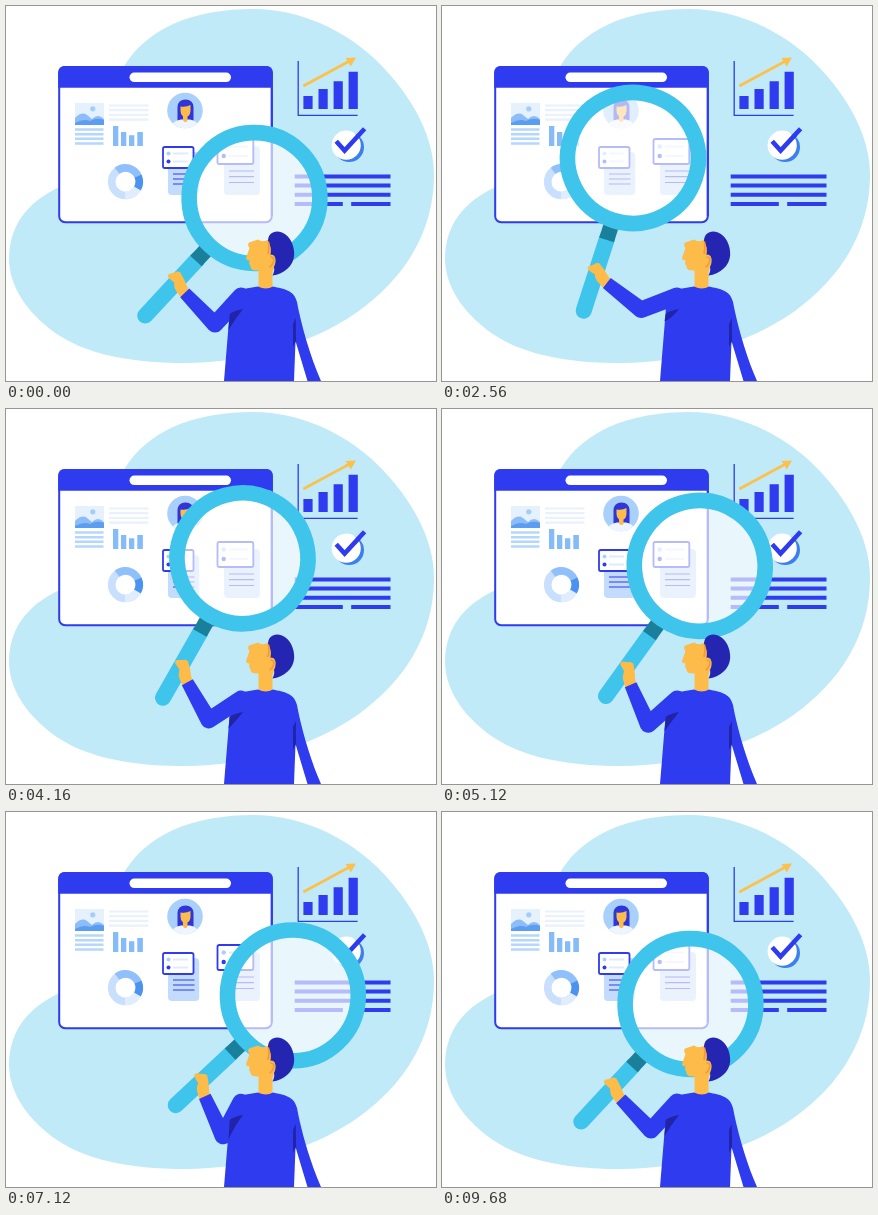
Write an HTML page that moves like this. It is 430 px wide and 375 px high and loops after 9.76 s.

```html
<!DOCTYPE html>
<html lang="en">
<head>
<meta charset="utf-8">
<title>Research dashboard</title>
<style>
html, body { margin: 0; width: 100%; height: 100%; overflow: hidden; background: #fff; }
svg { display: block; width: 430px; height: 375px; }
</style>
</head>
<body>
<svg viewBox="0 0 430 375">
  <path fill="#c1eaf9" d="M247 3C300 3 352 30 385 70C415 105 429 140 428 172C427 225 400 272 350 307C305 338 240 357 180 357C120 357 70 347 38 318C15 298 3 275 3 252C4 215 25 193 60 178C90 165 98 130 105 95C112 62 130 36 165 19C190 7 220 3 247 3Z"/>

  <!-- window -->
  <rect x="53.2" y="61" width="212.6" height="155.3" rx="6" fill="#fff" stroke="#2f3bee" stroke-width="2"/>
  <path fill="#2f3bee" d="M52.2 81.8V67Q52.2 60 59 60H260Q266.8 60 266.8 67V81.8Z"/>
  <rect x="123.5" y="66.5" width="101.5" height="9.6" rx="4.8" fill="#fff"/>

  <!-- picture and copy -->
  <rect x="69" y="97" width="29" height="22" fill="#e6f1fe"/>
  <circle cx="86.8" cy="102.8" r="2.6" fill="#a4cdfb"/>
  <path fill="#8dbdf8" d="M69 119V112Q76 105 81 109L86 113Q92 107 98 113V119Z"/>
  <path fill="#5b9df0" d="M69 119V117Q78 112 84 115Q91 111 98 114V119Z"/>
  <path stroke="#b5d6fd" stroke-width="2.4" d="M69 123.5H97.5M69 128.2H97.5M69 132.8H97.5M69 137.5H97.5"/>
  <path stroke="#e9f1fd" stroke-width="2.2" d="M103 99.5H142.5M103 104.2H142.5M103 108.9H142.5M103 113.6H142.5"/>
  <path fill="#86bbfa" d="M107 120h5.3v20h-5.3zM115 126h5.3v14h-5.3zM123 129.3h5.3v10.7h-5.3zM131.3 126h5.6v14h-5.6z"/>

  <!-- donut -->
  <g fill="none" stroke-width="7.6">
    <circle cx="119.5" cy="175.7" r="13.8" stroke="#c8dffd"/>
    <path stroke="#8fc0fb" d="M111 164.8A13.8 13.8 0 0 1 132 170"/>
    <path stroke="#4c93f0" d="M132 170A13.8 13.8 0 0 1 131.4 182.6"/>
    <path stroke="#e0edfe" d="M131.4 182.6A13.8 13.8 0 0 1 119 189.5"/>
  </g>

  <!-- avatar -->
  <clipPath id="face"><circle cx="179" cy="104.5" r="17.8"/></clipPath>
  <circle cx="179" cy="104.5" r="17.8" fill="#a9cffb"/>
  <g clip-path="url(#face)">
    <path fill="#2f35d8" d="M171.5 116V101Q172 93.5 179.5 93.5Q187 93.5 187.5 101V116Z"/>
    <path fill="#eef5ff" d="M164 123Q166 114.500 175 113.500H184Q192 114.500 194 123Z"/>
    <path fill="#fdbb49" d="M174.500 100.500Q180 101.500 184.500 99V105Q184 109.500 181.500 110.500V114.500Q179.500 118 177 114.500V110.500Q174.500 108.500 174.500 105Z"/>
  </g>

  <!-- cards -->
  <rect x="162" y="146" width="31.2" height="43" rx="4" fill="#c3dcfd"/>
  <rect x="157" y="141" width="30.5" height="21" rx="1.800" fill="#fff" stroke="#2f3bee" stroke-width="1.800"/>
  <circle cx="162.500" cy="147.500" r="2" fill="#a9cffb"/>
  <circle cx="162.500" cy="155.500" r="2" fill="#2f3bee"/>
  <path stroke="#dfebfe" stroke-width="2" d="M167 147.500H182M167 155.500H182"/>
  <path stroke="#2f3bee" stroke-width="1.200" d="M167 168H188.500M167 173H188.500M167 178H188.500"/>

  <rect x="218" y="140" width="36" height="49" rx="4" fill="#c3dcfd"/>
  <rect x="211.500" y="133" width="35.800" height="25" rx="1.800" fill="#fff" stroke="#2f3bee" stroke-width="1.800"/>
  <circle cx="217.700" cy="140.500" r="2.200" fill="#a9cffb"/>
  <circle cx="217.700" cy="150" r="2.200" fill="#2f3bee"/>
  <path stroke="#dfebfe" stroke-width="2" d="M223 140.500H242M223 150H242"/>
  <path stroke="#2f3bee" stroke-width="1.200" d="M223 165H248M223 170.700H248M223 176.500H248"/>
  <path stroke="#2f3bee" stroke-width="2" d="M265.800 82V210"/>

  <!-- growth chart -->
  <path fill="none" stroke="#2f3bee" stroke-width="1.300" d="M292.200 55V109.300H351.600"/>
  <path fill="#2f3bee" d="M297.400 90h9.200v13h-9.200zM312.500 83h9.200v20h-9.200zM327.600 75.200h9.200v27.800h-9.200zM342.600 65.800h9.200v37.200h-9.200z"/>
  <path stroke="#fcc04c" stroke-width="2.800" d="M297.300 80L344 54.800"/>
  <path fill="#fcc04c" d="M339.500 52L350 51.500L344.800 60.500Z"/>

  <!-- tick -->
  <circle cx="343.200" cy="141.200" r="14.800" fill="#3c80ee"/>
  <circle cx="340.200" cy="139.200" r="14.600" fill="#fff"/>
  <path fill="none" stroke="#2f3bee" stroke-width="4.600" d="M330.200 135.200L338.600 144.600L358.600 122.800"/>

  <path stroke="#2f3bee" stroke-width="4" d="M288.700 170.500H384.500M288.700 179.500H384.500M288.700 188.700H384.500M288.700 198H336.800M345.200 198H384.500"/>

  <!-- magnifier, handle pointing down -->
  <g id="lens">
    <circle r="60" fill="#fff" fill-opacity=".65"/>
    <path stroke="#3fc4ec" stroke-width="16" stroke-linecap="round" d="M0 84V160.500"/>
    <path stroke="#1a7f9b" stroke-width="15.500" d="M0 70V86"/>
    <circle r="65.400" fill="none" stroke="#3fc4ec" stroke-width="15.600"/>
  </g>

  <!-- person -->
  <path fill="#fdbb49" d="M264 233Q257 237 252 233.500L243 236.500Q241 239 243.500 242L240 252Q240 254 243.500 254.500L243 258Q244.500 259 244.500 261Q245 265 252.500 264.500V283Q260 287 266.500 283V266L270 255Z"/>
  <path fill="#2426b2" d="M262 235C262 227 269 223.500 276 226.500C284 230 288.500 239 288.200 249C287.500 260 278 268 266.500 269.500Q269 265 268 261Q271 255 268.500 250Q266 247.500 264.500 249Q266 241 262 235Z"/>
  <path fill="none" stroke="#f39a3a" stroke-width="1.600" d="M262.500 235.500Q263.500 243 262 248M264.500 251Q269 251 267.500 256Q266 260 263.500 261"/>
  <path fill="#2f3bee" d="M218 375L223.500 308C224 292 228 284 240 282.500L252 280.500Q260 284.500 267 280.500C278 283 288 284 291 296C295 318 304 350 315 375H301.500L289.500 335L288 375Z"/>
  <path fill="#2124a8" d="M287 341V318L289.800 312L290 335Z"/>
  <path id="hand" fill="#fdbb49" d="M-2 5L4 6.500L9 8.500L18 11Q21 10 21.500 7L24.500 2Q25 -1 22 -1.200L15 -.5Q11 -4.500 7 -5L-1 -6Z"/>
  <path id="arm" fill="#2f3bee"/>
  <path id="shade" fill="#2124a8"/>
</svg>
<script>
const LOOP = 9760, STEP = 80;
// time, lens x, lens y, handle tilt, grip distance
const KEYS = [
  [0, 248.5, 192, 42.9, 117],
  [1040, 208.5, 168.4, 27, 120.5],
  [1440, 193, 161, 20.8, 121.6],
  [1960, 172.4, 155, 13, 124],
  [2560, 191, 152, 17.9, 127],
  [3120, 207.8, 150.2, 22.2, 130],
  [4160, 236.5, 149.3, 29.7, 135],
  [5200, 259.5, 157.5, 36.3, 137],
  [6080, 273.5, 169, 41.4, 138.6],
  [7010, 288.5, 183, 47, 134],
  [8240, 270.3, 187.5, 45.4, 126.8],
  [9680, 248.5, 192, 42.9, 117],
  [LOOP, 248.5, 192, 42.9, 117]
];
const SHOULDER = [235, 290], UPPER = 38.5, FORE = 43.5;
const $ = id => document.getElementById(id);
const lens = $("lens"), hand = $("hand"), arm = $("arm"), shade = $("shade");
const deg = 180 / Math.PI;

function poseAt(t) {
  let i = 1;
  while (KEYS[i][0] < t) i++;
  const a = KEYS[i - 1], b = KEYS[i], k = (t - a[0]) / (b[0] - a[0]);
  return a.map((v, j) => v + (b[j] - v) * k);
}

// two-bone elbow, bending downwards
function elbowFor([wx, wy]) {
  const [sx, sy] = SHOULDER, dx = wx - sx, dy = wy - sy, d = Math.hypot(dx, dy);
  const along = (UPPER ** 2 - FORE ** 2 + d * d) / (2 * d);
  const out = Math.sqrt(Math.max(0, UPPER ** 2 - along ** 2));
  const ux = dx / d, uy = dy / d;
  return [sx + ux * along + uy * out, sy + uy * along - ux * out];
}

const fmt = points => points.map(p => p.map(v => v.toFixed(2)).join(" ")).join("L");

// tapered limb; round ends come from arcs of each radius
function limb(a, ra, b, rb, cap) {
  const d = Math.hypot(b[0] - a[0], b[1] - a[1]);
  const nx = (a[1] - b[1]) / d, ny = (b[0] - a[0]) / d;
  const side = (p, r) => [p[0] + nx * r, p[1] + ny * r];
  const end = cap ? `A${rb} ${rb} 0 0 0 ` : "L";
  return `M${fmt([side(a, ra), side(b, rb)])}${end}${fmt([side(b, -rb)])}L${fmt([side(a, -ra)])}A${ra} ${ra} 0 0 0 ${fmt([side(a, ra)])}Z`;
}

function draw(t) {
  const [, x, y, tilt, grip] = poseAt(t);
  const s = Math.sin(tilt / deg), c = Math.cos(tilt / deg);
  const wrist = [x - s * grip + c * 13.5, y + c * grip + s * 13.5];
  const elbow = elbowFor(wrist);
  const turn = Math.atan2(wrist[1] - elbow[1], wrist[0] - elbow[0]) * deg;

  lens.setAttribute("transform", `translate(${x} ${y}) rotate(${tilt})`);
  hand.setAttribute("transform", `translate(${wrist}) rotate(${turn})`);
  arm.setAttribute("d", limb(elbow, 8.3, wrist, 6.3, false) + limb(elbow, 8.3, SHOULDER, 8.5, true));
  const tip = 316 + (elbow[1] - 305) * 0.6;
  shade.setAttribute("d", `M237 303Q227 305 223.700 308L222.500 ${tip}Q229 313 237 303Z`);
}

function tick(now) {
  draw(Math.floor((now % LOOP) / STEP) * STEP);
  requestAnimationFrame(tick);
}
draw(0);
requestAnimationFrame(tick);
</script>
</body>
</html>
```
